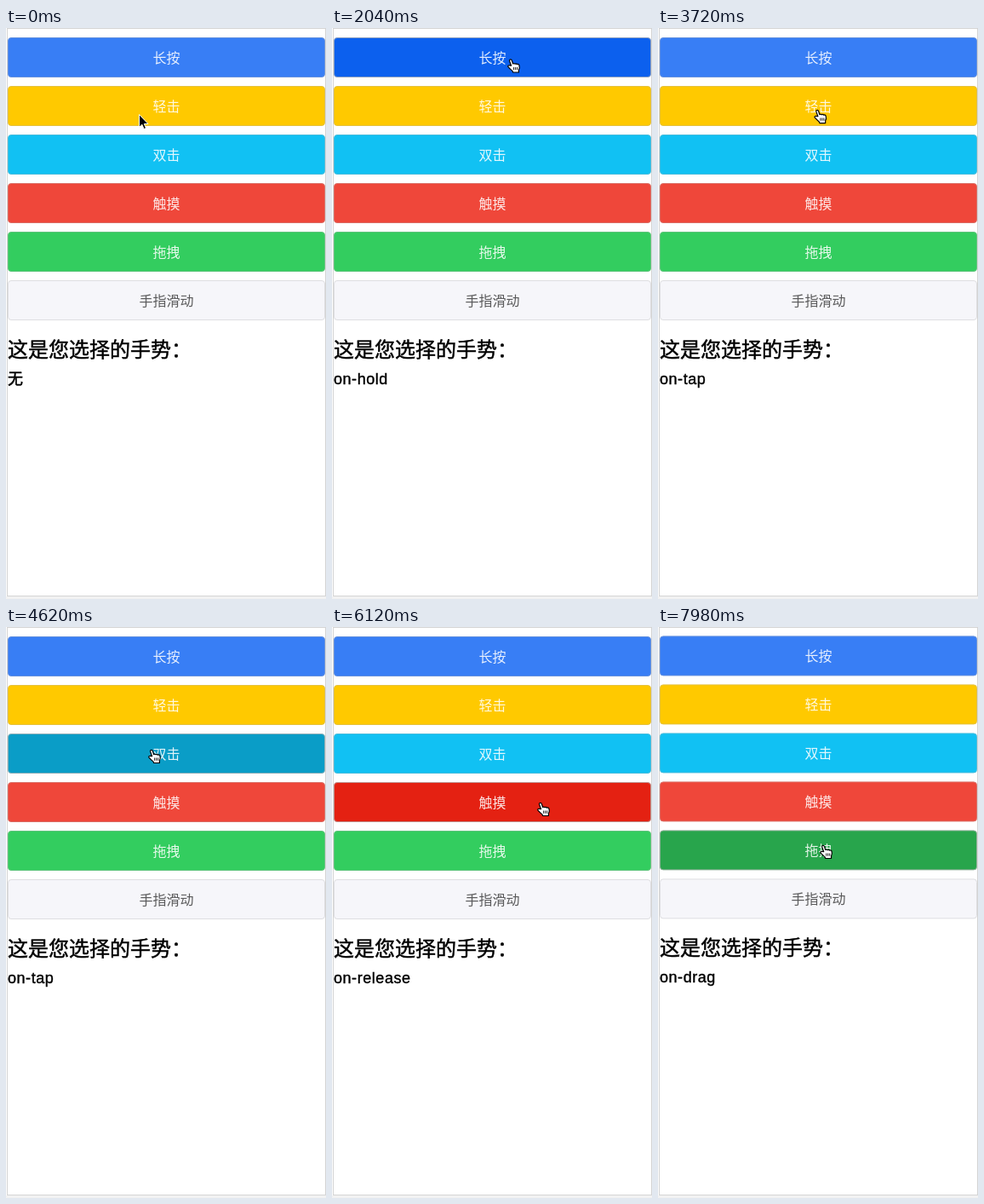
These frames come from a looping animation (376x670 px, 8000 ms). An HTML page:

```html
<!DOCTYPE html>
<html lang="zh">
<head>
<meta charset="utf-8">
<style>
  html, body { margin: 0; width: 100%; height: 100%; overflow: hidden; background: #fff; }
  svg { display: block; font-family: "Noto Sans CJK SC", "Noto Sans CJK", sans-serif; }
  .label { font-size: 16px; text-anchor: middle; fill-opacity: .88; }
  .title, #result { stroke: #000; stroke-width: .5px; }
  .title { font-size: 24px; }
  #result { font-size: 18px; }
  #result.latin { font-family: "Liberation Sans", Arial, sans-serif; letter-spacing: .55px; stroke-width: .4px; }
</style>
</head>
<body>
<svg width="376" height="670" viewBox="0 0 376 670">
  <rect y="667" width="376" height="3" fill="#f2f2f2"/>
  <rect x="1.5" y=".5" width="374" height="666" fill="#fff" stroke="#d4d4d4"/>
  <g id="page">
    <g id="buttons"></g>
    <text class="title" x="2" y="385.5">这是您选择的手势：</text>
    <text id="result" x="2" y="418"></text>
  </g>
  <path id="arrow" d="M0 0V15L3.4 11.8 5.6 17 8 16 5.8 11H10.5Z" fill="#000" stroke="#fff"/>
  <g id="hand" stroke="#000" stroke-linejoin="round">
    <path fill="#fff" stroke-width="1.2" d="M4.6 8.2L2.6 2.6Q2.4.8 3.9.8 5 .8 5.4 2.2L6.6 6Q7.8 5 9 6.2 10.4 5.2 11.4 6.6 13.4 5.8 14 8 14.8 11 13.4 13V16H6.6L6 14.4Q3 12 .8 9.4.6 7.6 2.4 7.8Z"/>
    <path fill="none" stroke-width=".9" d="M7.6 10V13.2M9.6 10V13.2M11.6 10V13.2"/>
  </g>
</svg>
<script>
const LOOP = 8000;
const START = { x: 156.5, y: 101.5 };
const $ = id => document.getElementById(id);

const buttons = [
  { label: '长按', color: '#387ef5', active: '#0c60ee' },
  { label: '轻击', color: '#ffc900', active: '#e6b500' },
  { label: '双击', color: '#11c1f3', active: '#0a9dc7' },
  { label: '触摸', color: '#ef473a', active: '#e42112' },
  { label: '拖拽', color: '#33cd5f', active: '#28a54c' },
  { label: '手指滑动', color: '#f6f6fa', ink: '#444' },
];

// The result appears on release unless a delay after the press is given.
const gestures = [
  { button: 0, x: 206, y: 36, press: 900, release: 2100, result: 'on-hold', delay: 800 },
  { button: 1, x: 184, y: 93.5, press: 2800, release: 2960, result: 'on-tap' },
  { button: 2, x: 167, y: 143.5, press: 4360, release: 4720, result: 'on-double-tap', taps: 2 },
  { button: 3, x: 241, y: 205.5, press: 5560, release: 5700, result: 'on-release' },
  { button: 3, x: 241, y: 205.5, press: 6060, release: 6260, result: 'on-touch' },
  { button: 4, x: 241, y: 255.5, press: 7420, release: LOOP, result: 'on-drag', delay: 140, drag: -51 },
];

$('buttons').innerHTML = buttons.map(({ label, ink = '#fff' }, i) => {
  const y = 11 + 57 * i;
  return `<rect x="2.5" y="${y + .5}" width="372" height="46" rx="3.5"/>
    <text class="label" x="188.5" y="${y + 30}" fill="${ink}">${label}</text>`;
}).join('');
const faces = [...document.querySelectorAll('#buttons rect')];

function ease(t, from, to) {
  const p = Math.min(1, Math.max(0, (t - from) / (to - from)));
  return p * p * (3 - 2 * p);
}

// Each move takes half a second and settles shortly before the press.
function pointerAt(t) {
  let { x, y } = START;
  for (const g of gestures) {
    const p = ease(t, g.press - 700, g.press - 200);
    x += (g.x - x) * p + (g.drag ?? 0) * ease(t, g.press, g.release);
    y += (g.y - y) * p;
  }
  return [x, y];
}

function isPressing({ press, release, taps = 1 }, t) {
  if (t < press || t >= release) return false;
  const phase = (t - press) / (release - press) * taps % 1;
  return taps === 1 || phase < .6;
}

function draw(t) {
  const pressed = gestures.find(g => isPressing(g, t))?.button;
  faces.forEach((face, i) => {
    const { color, active } = buttons[i], down = i === pressed;
    const fill = down ? active : color;
    face.style.fill = fill;
    face.style.stroke = `color-mix(in srgb, ${fill} ${down ? 25 : 65}%, #b2b2b2)`;
  });

  const shown = gestures.filter(g => t >= (g.delay ? g.press + g.delay : g.release)).pop();
  $('result').textContent = shown?.result ?? '无';
  $('result').classList.toggle('latin', !!shown);

  const isArrow = t < gestures[0].press - 400;
  $('arrow').style.display = isArrow ? '' : 'none';
  $('hand').style.display = isArrow ? 'none' : '';
  $(isArrow ? 'arrow' : 'hand').setAttribute('transform', `translate(${pointerAt(t)})`);
  $('page').setAttribute('transform', `translate(0 ${t >= 7620 ? -.6 : 0})`);
}

function tick() {
  draw(performance.now() % LOOP);
  requestAnimationFrame(tick);
}
tick();
</script>
</body>
</html>
```
